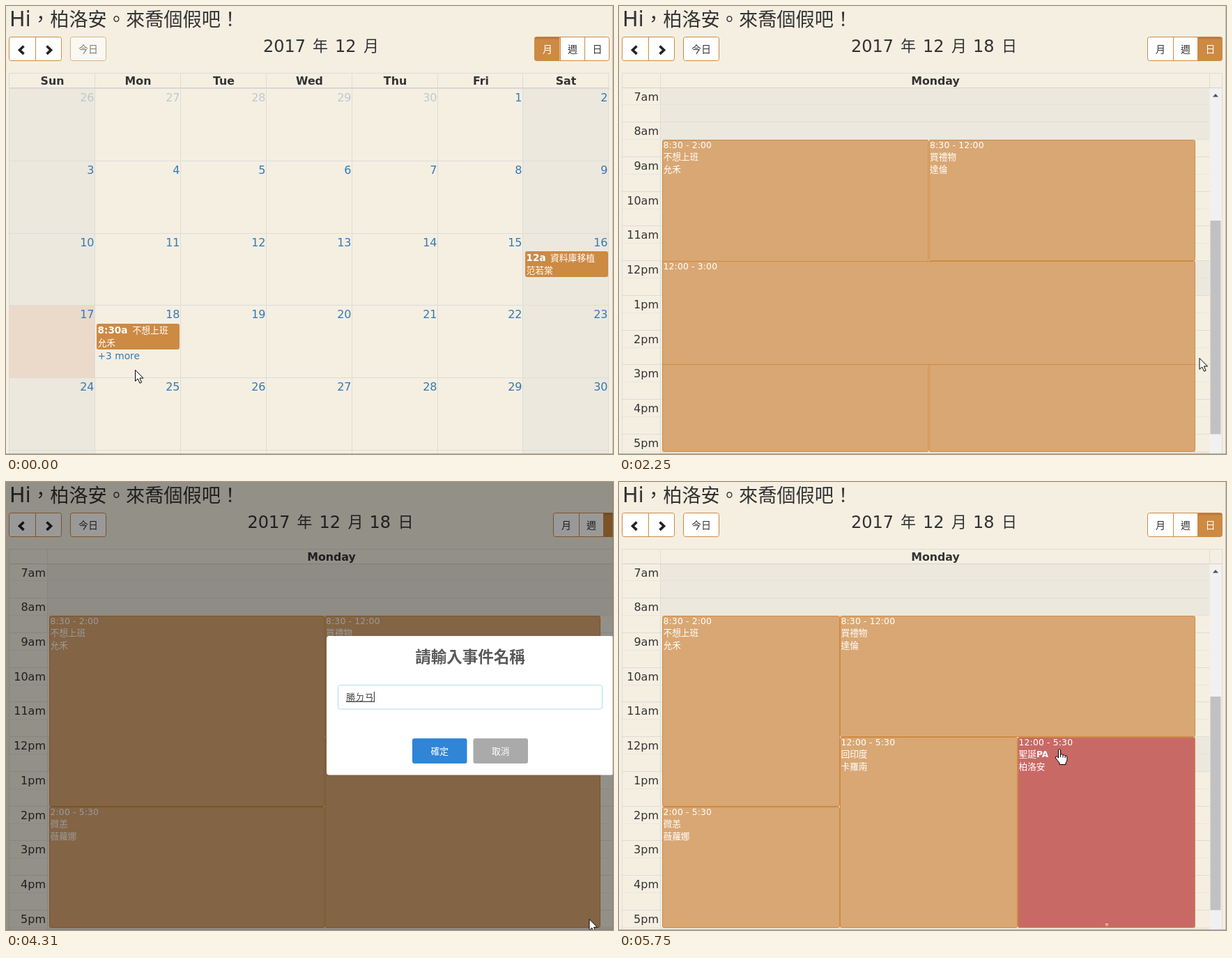
An HTML page that plays this animation: 871 by 643 pixels, repeating every 6.56 s.

```html
<!DOCTYPE html>
<html lang="zh-Hant">
<head>
<meta charset="utf-8">
<title>Calendar</title>
<style>
  html, body { margin: 0; width: 100%; height: 100%; overflow: hidden; background: #f5efe2; }
  svg { display: block; width: 871px; height: 643px; }
  text { font-family: "DejaVu Sans", "Noto Sans CJK TC", "Noto Sans CJK", sans-serif; white-space: pre; }
</style>
</head>
<body>
<svg id="stage" viewBox="0 0 871 643"></svg>
<script>
const INK = '#333', LINK = '#337ab7', GRID = '#dddcd8', SHADE = '#ece8dd';
const AMBER = '#cd8a43', TAN = '#d9a773', RED = '#c96966', BG = '#f5efe2';
const LOOP = 6560;

const people = { me: '柏洛安', a: '允禾', b: '達倫', c: '卡羅南', d: '薇蘿娜', e: '范若棠' };

const range = n => [...Array(n).keys()];
const rect = (x, y, w, h, fill, more = '') =>
  `<rect x="${x}" y="${y}" width="${w}" height="${h}" fill="${fill}" ${more}/>`;
const line = (x1, y1, x2, y2, color = GRID, more = '') =>
  `<path d="M${x1} ${y1}L${x2} ${y2}" stroke="${color}" ${more}/>`;
const text = (x, y, str, size, fill = INK, more = '') =>
  `<text x="${x}" y="${y}" font-size="${size}" fill="${fill}" ${more}>${str}</text>`;
const MID = 'text-anchor="middle"', END = 'text-anchor="end"';
const BOLD = 'font-weight="700"', LIGHT = 'font-weight="300"';

function title(x, parts) {
  const offsets = [0, 71, 103, 144, 175, 216];
  return parts.map((p, i) =>
    text(x + offsets[i], i % 2 ? 65 : 66, p, i % 2 ? 22 : 24, INK, i % 2 ? LIGHT : '')).join('');
}

function toolbar(active, dx) {
  const chevron = (x, d) =>
    `<path d="M${x - 3 * d} 57.5l${6 * d} 5.7l${-6 * d} 5.7" fill="none" stroke="#222" stroke-width="3.6"/>`;
  const views = [['月', 758, 795], ['週', 795, 830], ['日', 830, 866]];
  const frame = `stroke="${AMBER}" rx="3"`;
  const tabs = views.map(([name, l, r], i) => {
    const on = i === active;
    return (on ? rect(l + .5, 44.5, r - l - 1, 34, AMBER, 'rx="2"') +
                 rect(l + .5, 44.5, r - l - 1, 3, '#000', 'opacity=".1"') : '') +
      (i ? line(l + .5, 45, l + .5, 78, AMBER) : '') +
      text((l + r) / 2 + .5, 67, name, 14, on ? '#fff' : INK, MID + ' ' + LIGHT);
  }).join('');
  return text(5, 29, 'Hi', 30) +
    text(36, 29, `，${people.me}。來喬個假吧！`, 27.2, INK, LIGHT) +
    rect(4.5, 44.5, 75, 34, '#fff', frame) + line(42.5, 45, 42.5, 78, AMBER) +
    chevron(22.5, -1) + chevron(61.5, 1) +
    `<g opacity="${active ? 1 : .6}">` + rect(92.5, 44.5, 51, 34, '#fff', frame) +
    text(118, 67, '今日', 14, INK, MID + ' ' + LIGHT) + '</g>' +
    `<g transform="translate(${dx})">` + rect(758.5, 44.5, 107, 34, '#fff', frame) + tabs + '</g>';
}

function monthView() {
  const col = i => Math.round(5 + i * 122.9) - .5;
  const row = i => Math.round(118 + i * 103.8) + .5;
  const days = ['Sun', 'Mon', 'Tue', 'Wed', 'Thu', 'Fri', 'Sat'];
  let out = rect(5, 118, 123, 525, SHADE) + rect(742, 118, 123, 525, SHADE) +
    rect(5, row(3), 123, 103.5, '#ebd9c9');
  out += range(8).map(i => line(col(i), 96, col(i), 643)).join('');
  out += line(5, 96.5, 866, 96.5) + range(6).map(i => line(5, row(i), 866, row(i))).join('') +
    line(5, 117.5, 866, 117.5, '#d2d2cd');
  out += days.map((d, i) => text(col(i) + 62, 113, d, 15.8, INK, MID + ' ' + BOLD)).join('');
  out += range(35).map(i => {
    const past = i < 5;
    return text(col(i % 7 + 1) - 1, row(Math.floor(i / 7)) + 18, past ? 26 + i : i - 4, 16,
      past ? '#bccad0' : LINK, END);
  }).join('');
  const chip = (x, y, time, w, name, who) => rect(x, y, 119, 37, AMBER, 'rx="3"') +
    text(x + 1.5, y + 14, time, 13.6, '#fff', BOLD) +
    text(x + w, y + 13.5, name, 12.8, '#fff') + text(x + 1.5, y + 31.5, who, 12.8, '#fff');
  out += chip(745, 352, '12a', 36, '資料庫移植', people.e) +
    chip(130, 456, '8:30a', 51.5, '不想上班', people.a) +
    text(131.5, 507, '+3 more', 13.8, LINK);
  return toolbar(0, 0) + title(369, ['2017', '年', '12', '月']) + out;
}

const hourY = h => 117.6 + (h - 7) * 49.72;
const hour12 = h => (Math.floor(h) + 11) % 12 + 1;
const clock = h => `${hour12(h)}:${h % 1 ? '30' : '00'}`;

function eventBox(x1, x2, from, to, lines, fill = TAN) {
  const y = Math.round(hourY(from)), h = Math.round(hourY(to)) - y;
  return rect(x1 + .5, y + .5, x2 - x1 - 1, h - 1, fill, `stroke="${AMBER}" rx="2"`) +
    text(x1 + 1.5, y + 11.5, `${clock(from)} - ${clock(to)}`, 12.4, '#fff', 'letter-spacing=".15"') +
    lines.map((s, i) => text(x1 + 1.5, y + 29 + i * 17.5, s, 12.7, '#fff')).join('');
}

function dayView(s) {
  const wide = Boolean(s.modal);
  const right = wide ? 873.5 : 847.5, edge = wide ? 853 : 827;
  let out = rect(60, 118, right - 60, hourY(8.5) - 118, SHADE) +
    rect(60, hourY(12), right - 60, hourY(13) - hourY(12), SHADE) +
    rect(60, hourY(17.5), right - 60, 10, SHADE);
  out += range(11).map(i => {
    const h = 7 + i;
    const y = Math.round(hourY(h)) - .5, half = Math.round(hourY(h + .5)) - .5;
    return line(5, y, right, y) + line(5, half, right, half, GRID, 'stroke-dasharray="1 1"') +
      text(57, y + 18.5, hour12(h) + (h < 12 ? 'am' : 'pm'), 16, INK, END);
  }).join('');
  out += line(5, 96.5, right + 18, 96.5) + line(5, 117.5, right + 18, 117.5, '#d2d2cd') +
    line(4.5, 96, 4.5, 643) + line(59.5, 96, 59.5, 643);
  out += text(wide ? 467 : 454, 113, 'Monday', 15.8, INK, MID + ' ' + BOLD);
  if (!wide) {
    out += line(847.5, 96, 847.5, 118) + line(865.5, 96, 865.5, 643) +
      rect(848, 118, 16.5, 525, '#f1f1f1') + rect(848.5, 308, 15, 306.5, '#c1c1c1') +
      '<path d="M852 130.5l4-4.5l4 4.5z" fill="#505050"/>';
  }

  // Columns share the width evenly; the new event adds a third one.
  const n = s.done ? 3 : 2;
  const x = i => 62 + Math.round((edge - 62) * i / n * 2) / 2;
  out += eventBox(62, x(1), 8.5, 14, ['不想上班', people.a]) +
    eventBox(x(1), edge, 8.5, 12, ['買禮物', people.b]) +
    eventBox(x(1), x(2), 12, 17.5, ['回印度', people.c]) +
    eventBox(62, x(1), 14, 17.5, ['微恙', people.d]);
  if (s.done) {
    out += eventBox(x(2), edge, 12, 17.5,
      [`聖誕<tspan font-size="12.2" ${BOLD}>PA</tspan>`, people.me], RED);
  }
  if (s.until) out += eventBox(62, edge, 12, s.until, []);
  if (s.grip) out += line(698, 634.5, 702, 634.5, '#fff') + line(698, 636.5, 702, 636.5, '#fff', 'opacity=".6"');
  return toolbar(2, wide ? 27 : 0) +
    title(wide ? 346.5 : 333, ['2017', '年', '12', '月', '18', '日']) + out;
}

function dialog({ zoom = 1, typed = '', raw }) {
  const button = (x, fill, label) => rect(x, 368, 78.5, 36, fill, 'rx="3"') +
    text(x + 39.2, 390.5, label, 12.8, '#fff', MID + ' font-weight="500"');
  const width = [...typed].reduce((w, c) => w + (c < '\u3000' ? 9 : 13.3), 0);
  return `<g transform="translate(666 320.5) scale(${zoom}) translate(-666 -320.5)">` +
    rect(460, 221, 412, 199.5, '#fff', 'rx="4"') +
    text(666, 258.5, '請輸入事件名稱', 22.5, '#595959', MID + ' ' + BOLD) +
    rect(476.5, 291.5, 379, 34.5, '#fff', 'stroke="#b4dbed" rx="3"') +
    (typed ? text(488, 313.5, typed, 13.3, '#444', LIGHT + (raw ? ' text-decoration="underline"' : ''))
           : text(488, 313.5, '事件名稱', 13.3, '#ccc')) +
    line(488.5 + width, 301, 488.5 + width, 316, '#222') +
    button(583, '#3085d6', '確定') + button(670.5, '#aaa', '取消') + '</g>';
}

function pointer(x, y, hand) {
  const arrow = 'M.5 .5V16.5L4.2 13L7 19.3L9.6 18.2L6.9 12.1H12z';
  const glove = 'M-1.5 1.5Q0 -.8 1.6 1.5V8Q4 6.6 5 9Q7.2 7.8 8.2 10Q11 9.3 11 12V16Q10.5 18.5 9 20V22.5H0V20' +
    'Q-2.5 17 -5.6 13Q-6 10.5 -3.6 11L-1.5 13z';
  const creases = hand ? '<path d="M1.6 8v4M5 9v3.5M8.2 10v3" stroke="#000" fill="none"/>' : '';
  return `<g transform="translate(${x} ${y})"><path d="${hand ? glove : arrow}" fill="#fff" ` +
    `stroke="#000" stroke-linejoin="round"/>${creases}</g>`;
}

const corner = [836.5, 627], confirm = [631.5, 382];
const asking = (at, box, pos = corner, hand) => ({ at, pos, hand, modal: true, box });
const dragging = (at, y, until, x = 832) => ({ at, pos: [x, y], until });
const steps = [
  { at: 0, month: true, pos: [185, 522] },
  { at: 590, month: true, pos: [200, 522] },
  { at: 810, pos: [200, 522] },
  { at: 1020, pos: [345, 487] },
  { at: 1220, pos: [640, 418] },
  { at: 1430, pos: [830, 374] },
  dragging(1640, 378, 12.5),
  dragging(1840, 402, 13),
  dragging(2050, 450, 14),
  dragging(2250, 505, 15, 832.5),
  dragging(2460, 560, 16, 836),
  dragging(2660, 603, 17, 840),
  dragging(2860, 627, 17.5, 836.5),
  asking(3080, { zoom: .976 }),
  asking(3290, {}),
  asking(3490, { typed: 'ㄕ', raw: true }),
  asking(3900, { typed: 'ㄕㄥ', raw: true }),
  asking(4110, { typed: '勝ㄉ', raw: true }),
  asking(4310, { typed: '勝ㄉㄢ', raw: true }),
  asking(4520, { typed: '聖誕', raw: true }),
  asking(4730, { typed: '聖誕PA' }),
  asking(4940, { typed: '聖誕PA' }, [735, 505]),
  asking(5130, { typed: '聖誕PA' }, confirm, true),
  { at: 5330, pos: confirm, modal: true, done: true },
  { at: 5540, pos: confirm, done: true },
  { at: 5750, pos: [632, 383], hand: true, done: true, grip: true },
];

const stage = document.getElementById('stage');
const draw = s => {
  stage.innerHTML = rect(0, 0, 871, 643, BG) + (s.month ? monthView() : dayView(s)) +
    (s.modal ? rect(0, 0, 871, 643, '#000', 'opacity=".4"') : '') +
    (s.box ? dialog(s.box) : '') + pointer(...s.pos, s.hand) +
    line(870.5, 0, 870.5, 643, '#777', 'opacity=".4"') + line(0, 642.5, 871, 642.5, '#777', 'opacity=".5"');
};

let shown;
const start = performance.now();
function tick() {
  const t = Math.max(0, performance.now() - start) % LOOP;
  const step = steps.findLast(s => s.at <= t);
  if (step !== shown) draw(shown = step);
  requestAnimationFrame(tick);
}
tick();
</script>
</body>
</html>
```
